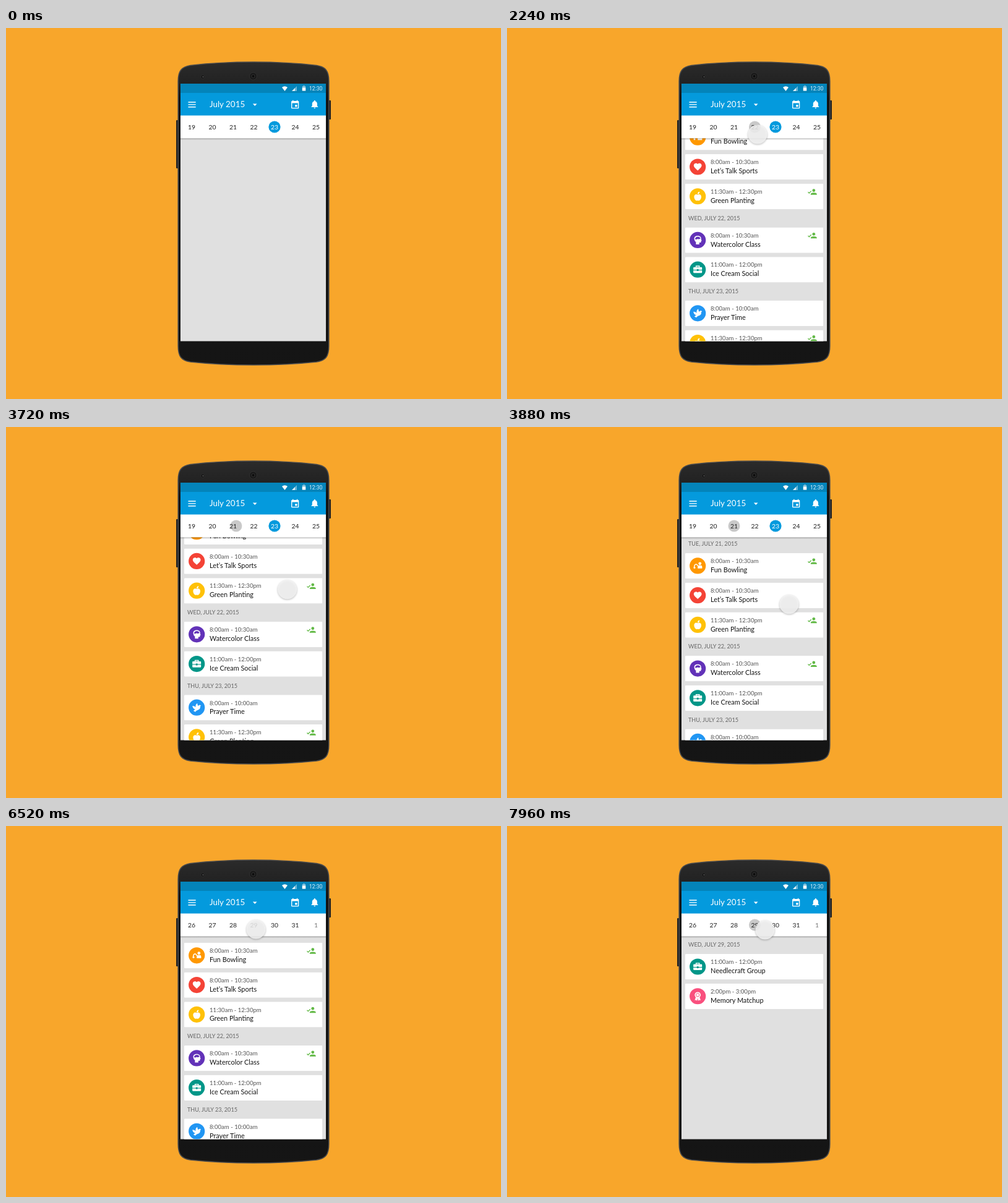
An HTML page that plays this animation: 800 px wide and 600 px high, repeating every 8 s.

```html
<!DOCTYPE html>
<html lang="en">
<head>
<meta charset="utf-8">
<title>Calendar agenda</title>
<style>
  html, body { margin: 0; width: 100%; height: 100%; overflow: hidden; background: #f8a62b; }
  svg { display: block; width: 800px; height: 600px; }
  text { font-family: Lato, "Open Sans", sans-serif; }
  .month { font-size: 13.4px; fill: #fff; }
  .clock { font: 8.6px Roboto, sans-serif; fill: #e4f3fb; }
  .day { font-size: 10.4px; fill: #222; text-anchor: middle; }
  .head { font-size: 9.1px; fill: #666; }
  .time { font-size: 9.6px; fill: #555; }
  .name { font-size: 10.9px; fill: #161616; }
  .card { fill: #fff; filter: drop-shadow(0 .6px .6px rgba(0,0,0,.14)); }
  #touch { filter: drop-shadow(0 1px 1.5px rgba(0,0,0,.32)); }
</style>
</head>
<body>
<svg viewBox="0 0 800 600">
  <defs>
    <linearGradient id="shell" x1="0" y1="0" x2="0" y2="1">
      <stop offset="0" stop-color="#2b2b2b"/>
      <stop offset=".07" stop-color="#222"/>
      <stop offset=".12" stop-color="#131313"/>
      <stop offset="1" stop-color="#151515"/>
    </linearGradient>
    <linearGradient id="fall" x1="0" y1="0" x2="0" y2="1">
      <stop offset="0" stop-opacity=".28"/>
      <stop offset="1" stop-opacity="0"/>
    </linearGradient>
    <clipPath id="screen"><rect x="282" y="90" width="235" height="416.5"/></clipPath>

    <g id="bowl">
      <circle cx="3.6" cy="-3.6" r="2.4"/>
      <path d="M0 4.4V1.6Q0-.6 2.4-.6H5Q7.2-.6 7.2 1.6V4.4Z"/>
      <path d="M-5.6 3C-5.6-2.6-1.8-4.6 .4 .6" fill="none" stroke="#fff" stroke-width="1.5"/>
      <circle cx="-5.2" cy="3" r="1.5"/>
    </g>
    <path id="heart" transform="scale(.64) translate(-12 -12)" d="M12 21.35l-1.45-1.32C5.4 15.36 2 12.28 2 8.5 2 5.42 4.42 3 7.5 3c1.74 0 3.41.81 4.5 2.09C13.09 3.81 14.76 3 16.5 3 19.58 3 22 5.42 22 8.5c0 3.78-3.4 6.86-8.55 11.54z"/>
    <path id="apple" d="M0-2.6C-3-4.4-6-2.6-5.8 1C-5.6 4.4-3.2 7.4-1.2 7Q0 6.5 1.2 7C3.2 7.4 5.6 4.4 5.8 1C6-2.6 3-4.4 0-2.6ZM-.2-3.4C-.4-5.8 1-7.2 3-7.4C3.2-5 2-3.6-.2-3.4Z"/>
    <g id="mind">
      <path d="M-5.6-1.4C-6-5-3.2-6.8 0-6.8C4-6.8 6-4.4 5.6-1.2L6.4 1.4L5.2 2V4.2H2.6V7H-2.8V3.6Q-5.3 1.6-5.6-1.4Z"/>
      <path d="M-4.3-1.6C-4.2-6.2 3.6-6.8 4.4-2.4Q2-.6-.4-2Q-2-.2-4.3-1.6Z" fill="#6232b8"/>
    </g>
    <g id="brief">
      <path d="M-2.6-3.8V-5.6H2.6V-3.8" fill="none" stroke="#fff" stroke-width="1.4"/>
      <path d="M-6-4H6Q7-4 7-3V.4H1.4V-.6H-1.4V.4H-7V-3Q-7-4-6-4ZM-7 1.4H-1.4V2.4H1.4V1.4H7V4.6Q7 5.6 6 5.6H-6Q-7 5.6-7 4.6Z"/>
    </g>
    <path id="dove" d="M-7-2.6Q-3.6-2.4-1.6-.6Q-2.6-4.6 1-7Q1-4 2.6-2.4Q3.6-4.6 5.4-4Q6.4-3.8 7.2-2.6L5.8-2.4Q6.2 3.2 1.2 4.2Q-.8 4.6-2.2 7L-5.4 5.2L-2.4 3Q-6.2 2-7-2.6Z"/>
    <g id="leaf">
      <path d="M-.8 5.2C-6.2 4.8-7.2-.4-3.2-6.2C.8-2.8 1.8 1.4-.8 5.2Z"/>
      <path d="M.6 5.8C.4 1.2 3-.8 6.8-1.2C7 3.4 4.8 6.4 .6 5.8Z"/>
    </g>
    <g id="award">
      <path d="M-3 1.4L-4.8 6.6L-2.4 6.2L-1 7.6L0 3L1 7.6L2.4 6.2L4.8 6.6L3 1.4Z"/>
      <circle cy="-2" r="4.8"/>
      <circle cy="-2" r="2.7" fill="none" stroke="#f9507e" stroke-width="1"/>
    </g>
    <g id="going">
      <path d="M-7 .2L-5.2 2L-1.8-1.4" fill="none" stroke="#62b946" stroke-width="1.3"/>
      <circle cx="2.3" cy="-2.4" r="2.4"/>
      <path d="M-2.6 4.6V3.4C-2.4 .6 7 .6 7.2 3.4V4.6Z"/>
    </g>
  </defs>

  <rect width="800" height="600" fill="#f8a62b"/>
  <rect x="275" y="149" width="4" height="78" rx="1" fill="#222"/>
  <rect x="521" y="117" width="4" height="31" rx="1" fill="#222"/>
  <path d="M278.2 86C278.2 70 283 63 298 60.5Q345 55 400 55T502 60.5C517 63 521.8 70 521.8 86V514C521.8 531 517 537.5 502 540Q455 545 400 545T298 540C283 537.5 278.2 531 278.2 514Z" fill="url(#shell)" stroke="#4b4b4b" stroke-width="1.6"/>
  <circle cx="399.5" cy="78" r="6" fill="#191919" stroke="#363636" stroke-width=".8"/>
  <circle cx="399.5" cy="78" r="2.6" fill="#0c0c0c" stroke="#3c3c3c" stroke-width=".8"/>
  <circle cx="318" cy="79" r="3.2" fill="#151515" stroke="#333" stroke-width=".8"/>
  <circle cx="318.5" cy="79" r="1.2" fill="#4a4a4a"/>

  <g clip-path="url(#screen)">
    <rect x="282" y="90" width="235" height="417" fill="#e0e0e0"/>
    <g id="list"></g>
    <rect x="282" y="178" width="235" height="3.5" fill="url(#fall)"/>
    <rect x="282" y="141" width="235" height="37.3" fill="#fff"/>
    <circle id="pick" cy="160" fill="#c9c9c9"/>
    <g id="strip"></g>
    <rect x="282" y="90" width="235" height="15.5" fill="#0484ba"/>
    <rect x="282" y="105" width="235" height="36.5" fill="#049add"/>
    <g fill="#fff">
      <path d="M446 96Q450.5 92.600 455 96L450.500 102Z"/>
      <path d="M470 94V102H462Z" opacity=".4"/>
      <path d="M467 97V102H462Z" opacity=".8"/>
      <path d="M480.300 93H482.700V94H484.200V101.500H478.800V94H480.300Z" opacity=".5"/>
      <rect x="478.800" y="96.500" width="5.400" height="5"/>
      <path d="M398.800 122.500H405.600L402.200 126Z"/>
      <path transform="translate(459 116) scale(.68)" d="M17 12h-5v5h5v-5zM16 1v2H8V1H6v2H5c-1.11 0-1.99.9-1.99 2L3 19c0 1.1.89 2 2 2h14c1.1 0 2-.9 2-2V5c0-1.1-.9-2-2-2h-1V1h-2zm3 18H5V8h14v11z"/>
      <path transform="translate(490.700 115.200) scale(.68)" d="M12 22c1.1 0 2-.9 2-2h-4c0 1.1.89 2 2 2zm6-6v-5c0-3.07-1.64-5.64-4.5-6.32V4c0-.83-.67-1.5-1.5-1.5s-1.5.67-1.5 1.5v.68C7.63 5.36 6 7.92 6 11v5l-2 2v1h16v-1z"/>
    </g>
    <path d="M294.500 120H306.700M294.500 123.900H306.700M294.500 127.800H306.700" stroke="#fff" stroke-width="1.400"/>
    <text class="clock" x="490" y="101">12:30</text>
    <text class="month" x="329" y="127.500">July 2015</text>
  </g>
  <circle id="touch" r="15.5" fill="#f5f5f5" fill-opacity=".84"/>
</svg>

<script>
const LOOP = 8000, STEP = 40;
const TOP = 192, PITCH = 47.75, HEAD = 22.9, DAY = 33.5;
const $ = id => document.getElementById(id);

const kinds = {
  bowl: ['#ff9800', 'Fun Bowling'],
  heart: ['#f44336', 'Let’s Talk Sports'],
  apple: ['#ffc107', 'Green Planting'],
  mind: ['#6232b8', 'Watercolor Class'],
  brief: ['#009688', 'Ice Cream Social'],
  dove: ['#2196f3', 'Prayer Time'],
  leaf: ['#8bc34a', 'Nutrition Perfect'],
  award: ['#f9507e', 'Memory Matchup']
};

// Each event: icon, hours, attending, optional title
const agenda = [
  ['TUE, JULY 21, 2015', [
    ['bowl', '8:00am - 10:30am', true],
    ['heart', '8:00am - 10:30am'],
    ['apple', '11:30am - 12:30pm', true]]],
  ['WED, JULY 22, 2015', [
    ['mind', '8:00am - 10:30am', true],
    ['brief', '11:00am - 12:00pm']]],
  ['THU, JULY 23, 2015', [
    ['dove', '8:00am - 10:00am'],
    ['apple', '11:30am - 12:30pm', true],
    ['leaf', '11:00am - 12:30pm']]],
  ['FRI, JULY 24, 2015', [
    ['bowl', '8:00am - 10:30am', true],
    ['heart', '8:00am - 10:30am']]],
  ['WED, JULY 29, 2015', [
    ['brief', '11:00am - 12:00pm', false, 'Needlecraft Group'],
    ['award', '2:00pm - 3:00pm']]]
];

function card(y, [kind, hours, going, title]) {
  const [color, name] = kinds[kind];
  return `<g transform="translate(0 ${y})">
    <rect class="card" x="288" width="223.300" height="41.300" rx="1"/>
    <circle cx="308.200" cy="20.500" r="13.100" fill="${color}"/>
    <g transform="translate(308.200 20.500)" fill="#fff"><use href="#${kind}"/></g>
    <text class="time" x="329" y="16.300">${hours}</text>
    <text class="name" x="329" y="31.200">${title || name}</text>
    ${going ? '<use href="#going" x="493.500" y="13.300" fill="#62b946"/>' : ''}
  </g>`;
}

const tops = [];
let html = '', y = TOP;
for (const [date, events] of agenda) {
  tops.push(y - TOP);
  html += `<text class="head" x="293" y="${y + 3.4}">${date}</text>`;
  events.forEach((e, i) => html += card(y + 15 + PITCH * i, e));
  y += HEAD + PITCH * events.length;
}
$('list').innerHTML = html;

let days = '';
for (let i = 0; i < 14; i++) {
  const x = 300 + DAY * i, n = i < 13 ? 19 + i : 1;
  const today = n === 23;
  if (today) days += `<circle cx="${x}" cy="160" r="9.600" fill="#049add"/>`;
  const fill = today ? '#fff' : n === 1 ? '#777' : '#222';
  days += `<text class="day" x="${x}" y="163.800" style="fill:${fill}">${n}</text>`;
}
$('strip').innerHTML = days;

const inOut = p => p < .5 ? 4 * p ** 3 : 1 - 4 * (1 - p) ** 3;
const out = p => 1 - (1 - p) ** 3;

// Moves: [start, end, from, to, ease]; the last one begun sets the value
function at(moves, t) {
  const [start, end, from, to, ease = inOut] = moves.findLast(m => m[0] <= t) || moves[0];
  const p = Math.min(1, Math.max(0, (t - start) / (end - start)));
  return from + (to - from) * ease(p);
}

const WED = -tops[1], LAST = -tops[4];
const scroll = [[400, 800, 330, 2.3, out], [2120, 2400, 2.3, WED], [3400, 3976, WED, 0], [6450, 6800, 0, LAST]];
const shift = [[5094, 5600, 0, -7 * DAY]];
const touchX = [[1600, 1800, 370, 405], [3360, 3976, 451, 456], [4800, 5094, 454, 454],
  [5094, 5600, 454, 404], [7000, 7160, 404, 417]];
const touchY = [[1600, 1800, 173.500, 172], [3400, 3976, 216, 288], [4800, 5000, 167, 167], [7800, 7960, 167, 168]];
const pickX = [[2040, 2240, 367, 400.5], [3560, 3800, 400.5, 367], [5094, 5600, 367, 367 - 3.5 * DAY], [6400, 6500, 400.5, 400.5]];
const pickR = [[400, 520, 0, 9.500, out], [6400, 6440, 0, 0], [6520, 6680, 0, 9.500, out]];
const shown = [[400, 2640], [3360, 4360], [4800, LOOP]];

function draw(now) {
  const t = Math.floor(now % LOOP / STEP) * STEP;
  $('list').setAttribute('transform', `translate(0 ${at(scroll, t)})`);
  $('strip').setAttribute('transform', `translate(${at(shift, t)} 0)`);
  $('pick').setAttribute('cx', at(pickX, t));
  $('pick').setAttribute('r', at(pickR, t));
  $('touch').setAttribute('cx', at(touchX, t));
  $('touch').setAttribute('cy', at(touchY, t));
  $('touch').style.display = shown.some(([a, b]) => t >= a && t < b) ? '' : 'none';
}

const begin = performance.now();
function tick() {
  draw(performance.now() - begin);
  requestAnimationFrame(tick);
}
tick();
</script>
</body>
</html>
```
